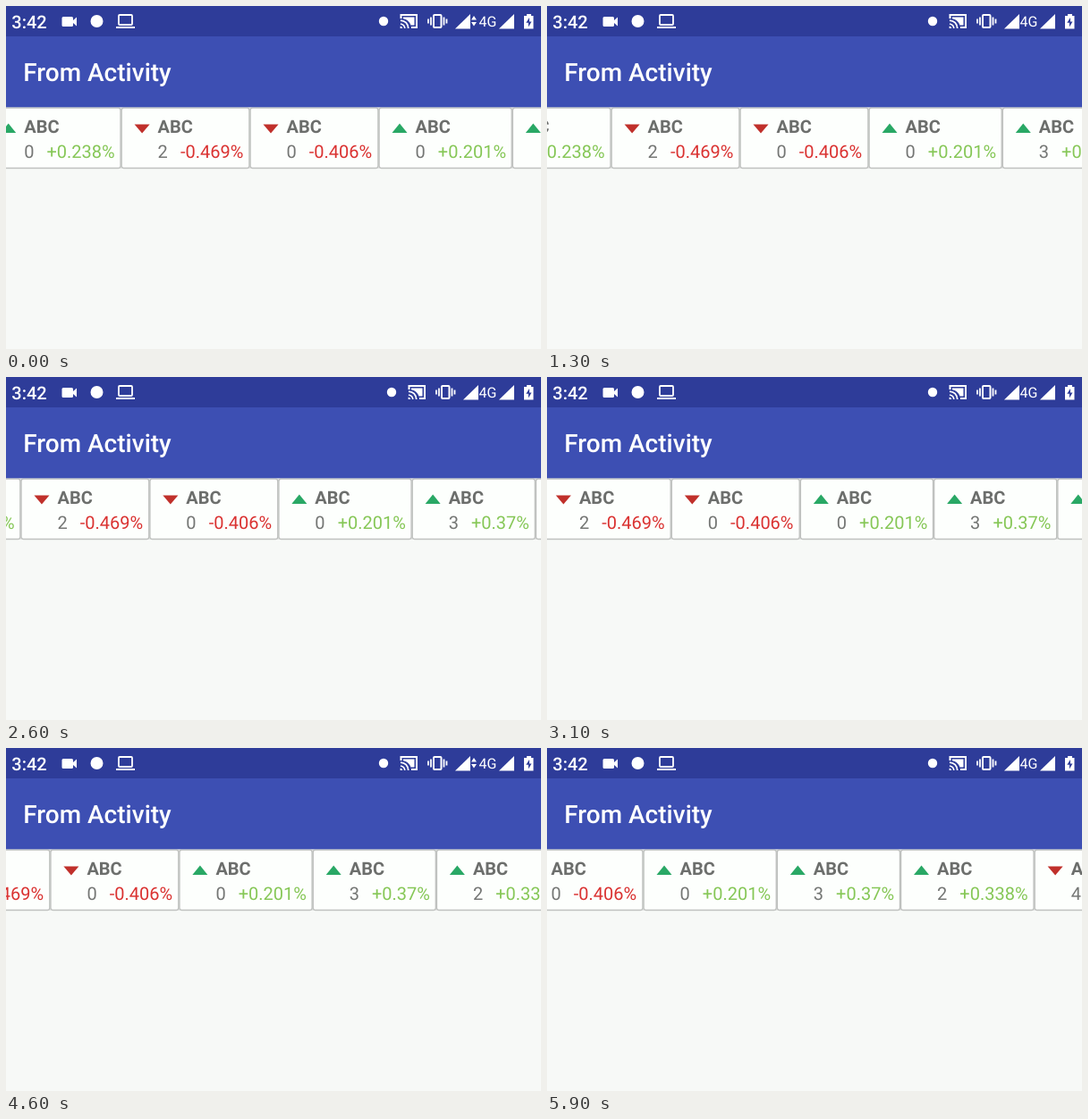
An HTML page that plays this animation: 598 by 384 pixels, repeating every 6000 ms.

```html
<!DOCTYPE html>
<html lang="en">
<head>
<meta charset="utf-8">
<title>Ticker</title>
<style>
  html, body { margin: 0; width: 100%; height: 100%; overflow: hidden; background: #f7f9f7; }
  svg { display: block; width: 598px; height: 384px; }
  text { font-family: Roboto, sans-serif; font-size: 20px; text-rendering: geometricPrecision; }
  .medium { font-weight: 500; fill: #fff; }
  .name { font-weight: 700; fill: #6c6e6c; }
  .value { fill: #747674; }
  .line { fill: none; stroke: #fff; stroke-width: 2; }
</style>
</head>
<body>
<svg viewBox="0 0 598 384">
  <rect width="598" height="384" fill="#f7f9f7"/>
  <rect y="112" width="598" height="70" fill="#e3e5e3"/>
  <g id="cards"></g>
  <rect width="598" height="113.3" fill="#3d4fb3"/>
  <rect width="598" height="34" fill="#2e3c99"/>
  <text class="medium" x="19.3" y="84" style="font-size:28px">From Activity</text>
  <text class="medium" x="6.3" y="24.8">3:42</text>
  <g fill="#fff">
    <path d="M64 12H73.500Q75 12 75 13.500V16L79 12.500V22.500L75 19V21.500Q75 23 73.500 23H64Q62.500 23 62.500 21.500V13.500Q62.500 12 64 12Z"/>
    <circle cx="101.500" cy="17" r="7"/>
    <rect class="line" x="126" y="10" width="15" height="11" rx="1" style="stroke-width:1.8"/>
    <rect x="123" y="23" width="21" height="2"/>
    <g id="radios">
      <circle cx="431" cy="17" r="5.200"/>
      <path class="line" d="M450.500 14V10H468V24H462"/>
      <path d="M453 12.500H465.500V21.500H461.500Q459 15 453 14.200Z"/>
      <path class="line" d="M450 16.200Q458 17 458.700 25M450 20Q454.300 20.700 454.800 25" style="stroke-width:1.7"/>
      <path d="M449.600 22.500Q452 22.800 452.200 25H449.600Z"/>
      <rect class="line" x="487" y="10" width="8.500" height="14" rx="1"/>
      <path class="line" d="M484 12.500V21.500M481 14.500V19.500M498.500 12.500V21.500M501.500 14.500V19.500" style="stroke-width:1.8"/>
      <path d="M511 25.500L528 9V25.500Z"/>
    </g>
    <path id="traffic" d="M520 15.500L523 11L526 15.500ZM520 18L523 22.500L526 18Z"/>
    <text x="528.500" y="22.800" style="font-size:16px">4G</text>
    <path d="M551 25.500L568 9V25.500Z"/>
    <path d="M582 9H587V11H589.500V25.500H579V11H582Z"/>
    <path d="M585 13L581.300 18.800H583.900V23.500L587.500 17.600H585Z" fill="#2e3c99"/>
  </g>
</svg>
<script>
const LOOP = 6000, STEP = 100;
const quotes = [
  [0, "+0.238%"], [2, "-0.469%"], [0, "-0.406%"], [0, "+0.201%"],
  [3, "+0.37%"], [2, "+0.338%"], [4, "-0.215%"]
];
const lefts = [-20.8, 128.6, 272.5, 416.5, 565.8, 704, 853.6];
// Scroll distance: [time, pixels]; the ticker speeds up midway.
const scroll = [[0, 0], [1300, 57], [2000, 86.3], [3100, 133.7], [3500, 151], [4100, 190.2], [5200, 262.6], [6000, 315.6]];
const el = id => document.getElementById(id);
const cards = el("cards"), radios = el("radios"), traffic = el("traffic");

function card([value, change], i) {
  const up = change[0] === "+";
  const width = (lefts[i + 1] || 998) - lefts[i];
  const arrow = up ? "M15 142L23.500 131.500L32 142Z" : "M15 132.500H32L23.500 142.500Z";
  return `<g transform="translate(${lefts[i]} 0)">
    <rect x=".6" y="114.200" width="${width - 1.2}" height="67.300" rx="2.500" fill="#fdfffd" stroke="#bfc1bf" stroke-width="1.300"/>
    <path d="${arrow}" fill="${up ? "#29a865" : "#c0302b"}"/>
    <text class="name" x="41" y="142.300">ABC</text>
    <text class="value" x="41" y="169.700">${value}</text>
    <text x="66.300" y="169.700" fill="${up ? "#86c757" : "#da3231"}">${change}</text>
  </g>`;
}

function scrollAt(t) {
  const k = scroll.findIndex(p => p[0] > t);
  const [t0, x0] = scroll[k - 1], [t1, x1] = scroll[k];
  return x0 + (x1 - x0) * (t - t0) / (t1 - t0);
}

function draw(now) {
  const t = Math.floor(now % LOOP / STEP) * STEP;
  const busy = t < 1000 || (t >= 3800 && t < 5100);
  cards.setAttribute("transform", `translate(${-scrollAt(t)} 0)`);
  radios.setAttribute("transform", `translate(${busy ? -9 : 0} 0)`);
  traffic.setAttribute("visibility", busy ? "visible" : "hidden");
}

cards.innerHTML = quotes.map(card).join("");
const start = performance.now();
function tick() {
  draw(performance.now() - start);
  requestAnimationFrame(tick);
}
tick();
</script>
</body>
</html>
```
